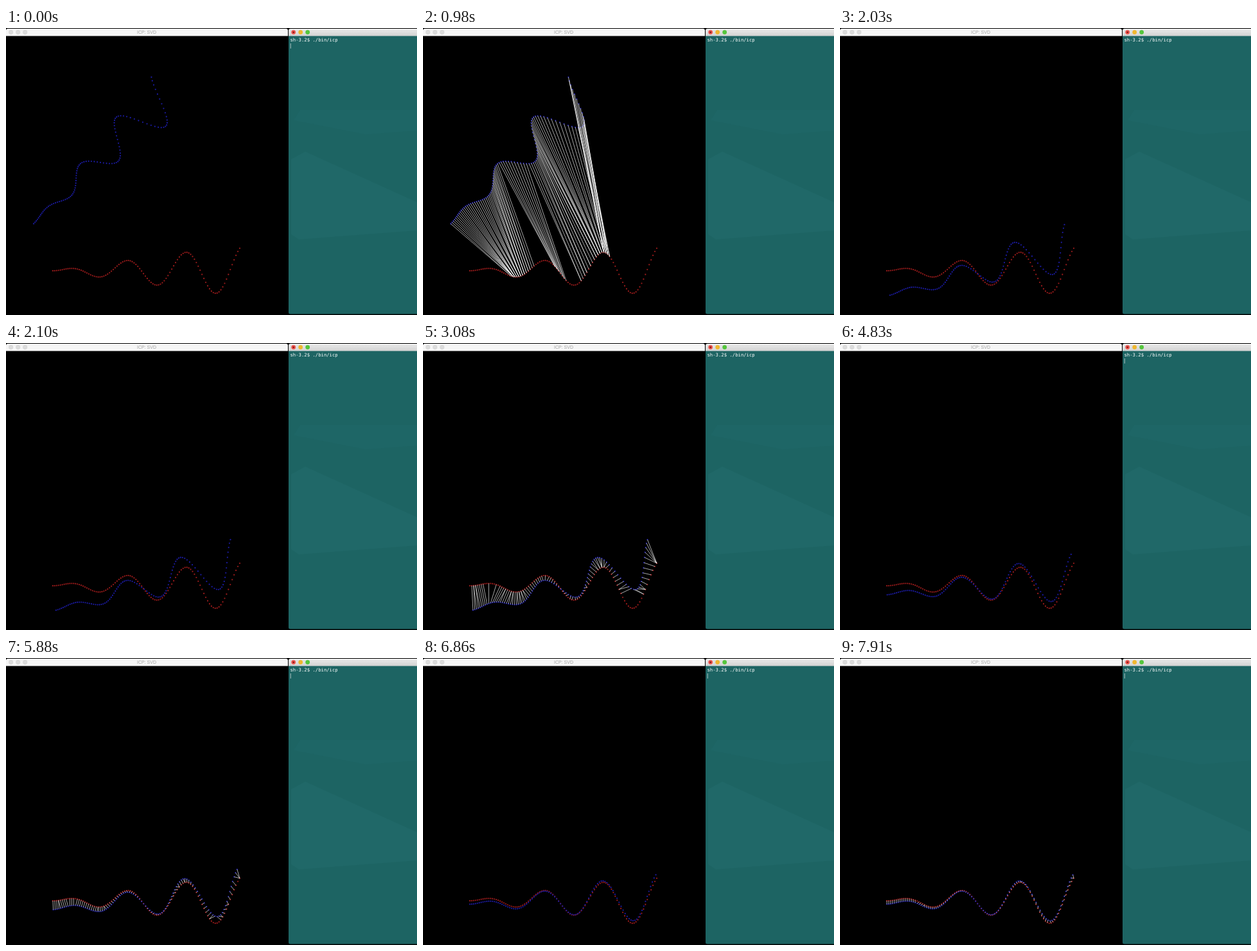
Write an HTML page with a canvas that moves like this. It is 640 px wide and 448 px high and loops after 8 s.

```html
<!DOCTYPE html>
<html lang="en">
<head>
<meta charset="utf-8">
<title>ICP: SVD</title>
<style>
  html, body { margin: 0; width: 100%; height: 100%; overflow: hidden; background: #000; }
  svg, canvas { position: absolute; left: 0; top: 0; width: 640px; height: 448px; }
  .title { font: 7px "Liberation Sans", Arial, sans-serif; fill: #a4a4a4; text-anchor: middle; }
  .shell { font: 7.25px "DejaVu Sans Mono", monospace; fill: #fff; }
</style>
</head>
<body>
<canvas id="plot" width="640" height="448"></canvas>
<svg viewBox="0 0 640 448">
  <defs>
    <linearGradient id="bar" x2="0" y2="1">
      <stop offset="0" stop-color="#ebebeb"/>
      <stop offset="1" stop-color="#d2d2d2"/>
    </linearGradient>
  </defs>

  <path d="M0 12.600V4Q0 1 3 1H436Q439 1 439 4V12.600Z" fill="#f6f6f6"/>
  <g fill="#dcdcdc" stroke="#d2d2d2" stroke-width=".5">
    <circle cx="7.700" cy="6.600" r="3.300"/>
    <circle cx="18.700" cy="6.600" r="3.300"/>
    <circle cx="29.700" cy="6.600" r="3.300"/>
  </g>
  <text class="title" x="219" y="9.300">ICP: SVD</text>

  <path d="M440 12H640V446.500H443Q440 446.500 440 444Z" fill="#1d6463"/>
  <path d="M444 205L466 193L640 272V316L456 330L444 322Z" fill="#206868"/>
  <path d="M448 144L458 128H640V160L560 166Z" fill="#1e6666"/>
  <path d="M440 12.600V4Q440 1 443 1H640V12.600Z" fill="url(#bar)"/>
  <circle cx="447.700" cy="6.600" r="3.400" fill="#ee544e"/>
  <circle cx="447.700" cy="6.600" r="1.200" fill="#6b0f0c"/>
  <circle cx="458.700" cy="6.600" r="3.400" fill="#f0b72e"/>
  <circle cx="469.700" cy="6.600" r="3.400" fill="#54c63c"/>
  <text class="shell" x="442.500" y="21">sh-3.2$ ./bin/icp</text>
  <rect id="cursor" x="442.700" y="24" width="1" height="8" fill="#a9c4c4"/>
</svg>
<script>
const LOOP = 8000, TICK = 70, COUNT = 100;
const ctx = document.getElementById('plot').getContext('2d');
const cursor = document.getElementById('cursor');

// Growing sine wave the moving cloud is fitted to.
const target = Array.from({ length: COUNT }, (_, i) => {
  const x = 291 * i / (COUNT - 1);
  return [73 + x, 379 - 0.139 * x * Math.sin(x / 14.62)];
});
const mean = axis => target.reduce((sum, p) => sum + p[axis], 0) / COUNT;
const center = [mean(0), mean(1)];

function makePose(degrees, origin) {
  const a = degrees * Math.PI / 180, c = Math.cos(a), s = Math.sin(a);
  const points = [], links = [];
  for (const p of target) {
    const x = p[0] - center[0], y = p[1] - center[1];
    const rx = c * x + s * y, ry = c * y - s * x;
    points.push([origin[0] + rx, origin[1] + ry]);
    // Matches are searched with both centroids aligned.
    const gap = q => Math.hypot(q[0] - center[0] - rx, q[1] - center[1] - ry);
    links.push(target.reduce((best, q) => gap(q) < gap(best) ? q : best));
  }
  return { points, links };
}

const poses = [
  makePose(44.4, [147.6, 204.2]),
  makePose(15.2, center),
  makePose(5.55, center),
  makePose(2.15, center)
];

// Alternates: show matches, then move to the next pose.
const switches = [910, 1960, 3080, 4130, 5040, 6090, 7140];

function dots(points, color) {
  ctx.fillStyle = color;
  ctx.beginPath();
  for (const [x, y] of points) {
    ctx.moveTo(x + 1.15, y);
    ctx.arc(x, y, 1.15, 0, 2 * Math.PI);
  }
  ctx.fill();
}

function draw(stage) {
  const { points, links } = poses[stage >> 1];
  ctx.clearRect(0, 0, 640, 448);
  dots(target, '#961a1a');
  dots(points, '#1a1a9c');
  if (stage % 2) {
    ctx.strokeStyle = '#fff';
    ctx.lineWidth = 0.65;
    ctx.beginPath();
    points.forEach((p, i) => {
      ctx.moveTo(...p);
      ctx.lineTo(...links[i]);
    });
    ctx.stroke();
  }
}

let shown = -1;
function render(now) {
  const t = Math.floor(now % LOOP / TICK) * TICK;
  const stage = switches.filter(s => t >= s).length;
  if (stage !== shown) draw(shown = stage);
  const lit = t < 70 || (t >= 387 && (t - 387) % 1064 < 532);
  cursor.style.visibility = lit ? 'visible' : 'hidden';
}

const start = performance.now();
function loop() {
  render(performance.now() - start);
  requestAnimationFrame(loop);
}
loop();
</script>
</body>
</html>
```
